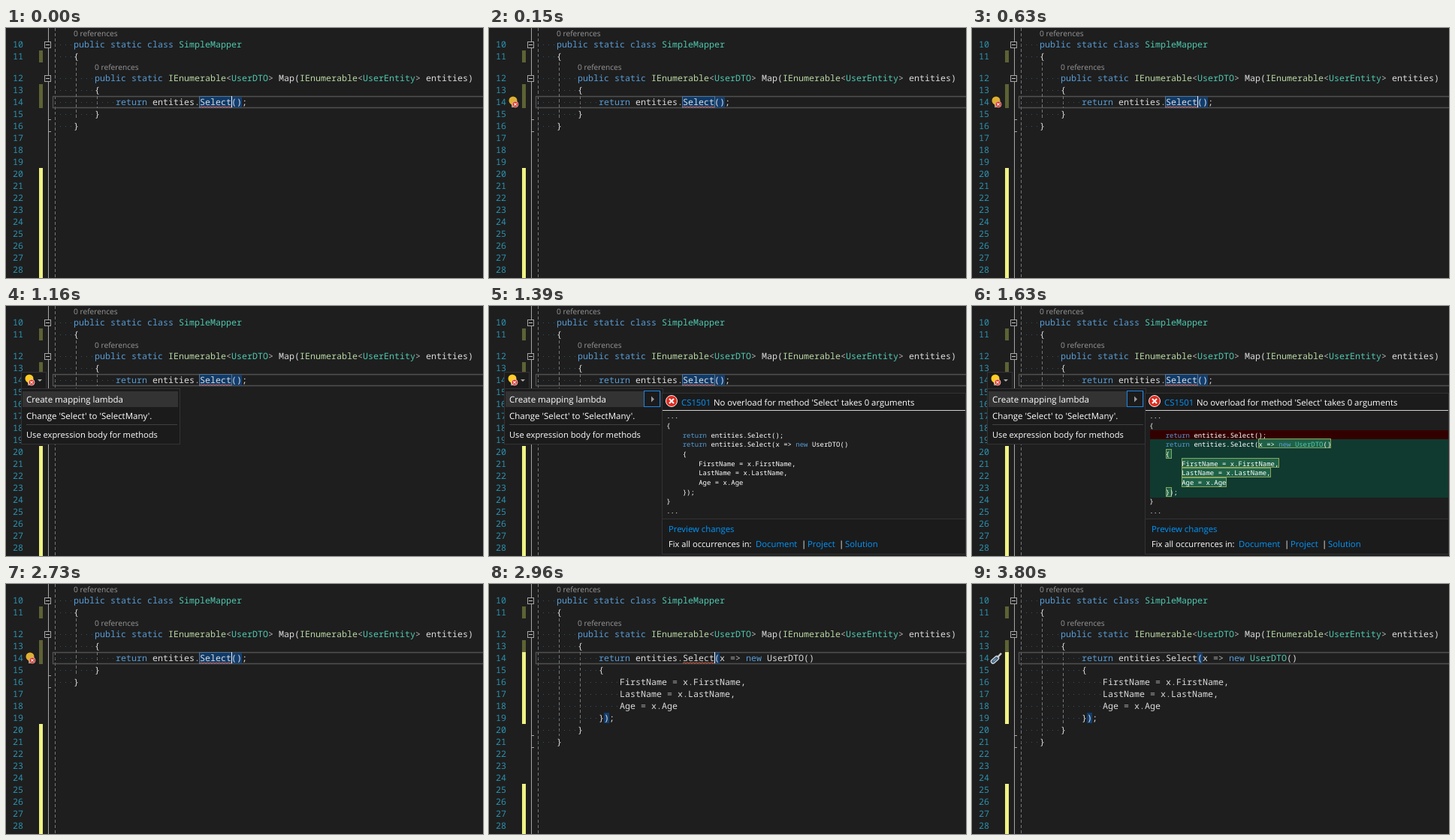
Animation of 635 by 334 pixels, one loop 3.88 s. Source, as an HTML page:

```html
<!DOCTYPE html>
<html lang="en">
<head>
<meta charset="utf-8">
<title>Create mapping lambda</title>
<style>
html, body { margin: 0; width: 100%; height: 100%; overflow: hidden; background: #1e1e1e; }
svg { display: block; width: 100%; height: 100%; }
text { white-space: pre; text-rendering: geometricPrecision; }
.code { font: 11.667px "Noto Sans Mono", monospace; }
.small { font: 500 8.96px "Noto Sans Mono", monospace; }
.ui { font: 11.35px "Open Sans", sans-serif; }
.menu { font: 11.5px "Open Sans", sans-serif; }
.tight { font: 11.15px "Open Sans", sans-serif; }
.lens { font: 10.2px "Open Sans", sans-serif; }
</style>
</head>
<body>
<svg id="stage" viewBox="0 0 635 334" xmlns="http://www.w3.org/2000/svg"></svg>
<script>
const LOOP = 3880;
const LEFT = 62, CW = 7;
const INK = '#dcdcdc', BLUE = '#569cd6', TEAL = '#4ec9b0', LINK = '#0097fb';
const PANEL = '#1b1b1c', EDGE = '#333337', OLIVE = '#5c6234', YELLOW = '#eff284';

const esc = s => s.replace(/&/g, '&amp;').replace(/</g, '&lt;').replace(/>/g, '&gt;');
const rect = (x, y, w, h, fill, stroke = 'none') =>
  `<rect x="${x}" y="${y}" width="${w}" height="${h}" fill="${fill}" stroke="${stroke}"/>`;
const frame = (x, y, w, h, fill, stroke) => rect(x + .5, y + .5, w - 1, h - 1, fill, stroke);
const path = (d, stroke, width = 1, more = '') =>
  `<path d="${d}" fill="none" stroke="${stroke}" stroke-width="${width}" ${more}/>`;
const text = (cls, x, y, s, fill = '#fff', more = '') =>
  `<text class="${cls}" x="${x}" y="${y}" fill="${fill}" ${more}>${esc(s)}</text>`;
const group = (id, body) => `<g id="${id}">${body}</g>`;

// Vertical centre of an editor line; a caption row sits above line 12.
const mid = n => n < 12 ? 22 + (n - 10) * 16 : 67 + (n - 12) * 16;

function colour(word) {
  if (/^(public|static|class|return|new)$/.test(word)) return BLUE;
  if (/^(SimpleMapper|UserDTO|UserEntity)$/.test(word)) return TEAL;
  if (word === 'IEnumerable') return '#b8d7a3';
  return /^[<>=.]+$/.test(word) ? '#b4b4b4' : INK;
}

function codeLine(n, depth, src) {
  const x0 = LEFT + depth * 4 * CW, y = mid(n);
  let out = '';
  for (let x = LEFT; x < x0; x += CW) out += rect(x + 3, y, 1, 1, '#2a536c');
  for (const m of src.matchAll(/\w+|[<>=.]+|[^\w\s<>=.]+/g))
    out += text('code', x0 + m.index * CW, y + 4, m[0], colour(m[0]),
      n === 14 && m[0] === 'UserDTO' ? 'id="dto"' : '');
  return out;
}

const codeLines = (from, list) =>
  list.map(([depth, s], i) => codeLine(from + i, depth, s)).join('');

const bar = (y, end, fill) => rect(44, y, 5, end - y, fill);
const guide = (x, y, end) => path(`M${x + .5} ${y}V${end}`, '#777', 1, 'stroke-dasharray="4 3"');
const tick = y => path(`M56 ${y + .5}H60`, '#a5a5a5');
const fold = y => frame(51, y - 4, 9, 9, '#1e1e1e', '#a5a5a5') + path(`M53 ${y + .5}H58`, '#c8c8c8');

function gutter() {
  let out = '';
  for (let n = 10; n <= 28; n++) out += text('code', 9, mid(n) + 4, String(n), '#2b91af');
  return out + path('M56.5 0V334', '#a5a5a5') + fold(22) + fold(67) + guide(65, 0, 334) +
    bar(30, 46, OLIVE) + bar(75, 91, OLIVE);
}

const header = () =>
  text('lens', 90, 11, '0 references', '#999') + text('lens', 118, 56, '0 references', '#999') +
  codeLines(10, [[1, 'public static class SimpleMapper'], [1, '{'],
    [2, 'public static IEnumerable<UserDTO> Map(IEnumerable<UserEntity> entities)'], [2, '{']]);

const before = () =>
  bar(91, 107, OLIVE) + bar(187, 334, YELLOW) + guide(93, 46, 123) + guide(121, 91, 107) +
  tick(122) + tick(138) + frame(257, 91, 44, 16, '#0f3a68', '#56748f') +
  rect(301, 92, 13, 14, '#113d6f') +
  codeLines(14, [[3, 'return entities.Select();'], [2, '}'], [1, '}']]);

const after = () =>
  bar(91, 187, YELLOW) + bar(267, 334, YELLOW) + guide(93, 46, 203) + guide(121, 91, 187) +
  tick(202) + tick(218) +
  group('braces', rect(300, 92, 7, 14, '#113d6f') + rect(153, 172, 7, 14, '#113d6f')) +
  codeLines(14, [[3, 'return entities.Select(x => new UserDTO()'], [3, '{'],
    [4, 'FirstName = x.FirstName,'], [4, 'LastName = x.LastName,'], [4, 'Age = x.Age'],
    [3, '});'], [2, '}'], [1, '}']]);

function squiggle() {
  let d = 'M258 106';
  for (let x = 260; x <= 300; x += 2) d += `L${x} ${x % 4 ? 106 : 104.5}`;
  return path(d, '#d9573f');
}

const bulb = (x, y, fill, ring) =>
  `<circle cx="${x}" cy="${y}" r="5.500" fill="${fill}"/>` + rect(x - 2, y + 4, 4, 3, fill) +
  rect(x - 2, y + 7.5, 4, 1.5, '#b0b0b0') +
  `<circle cx="${x + 3}" cy="${y + 5}" r="4" fill="#dc3028" stroke="${ring}" stroke-width=".8"/>` +
  path(`M${x + 1.3} ${y + 3.3}l3.4 3.4m0 -3.4l-3.4 3.4`, '#fff', 1.1);

const driver = () =>
  path('M28 103.5L33 99', '#d2d8de', 6.5, 'stroke-linecap="round"') +
  path('M28 103.5L33 99', '#45657f', 4, 'stroke-linecap="round"') +
  path('M34 98L39 92.5', '#d0d0d0', 2.5) + path('M28.5 103L31.5 100.3', '#a9c4da', 1);

const menu = () =>
  frame(20, 88, 34, 23, PANEL, EDGE) + bulb(31, 97, '#ffcc22', '#f4e4e0') +
  '<path d="M42 98h6l-3 3z" fill="#aaa"/>' +
  frame(20, 110, 212, 75, PANEL, EDGE) + rect(22, 114, 207, 21, '#333334') +
  rect(27, 158, 201, 1, '#3f3f46') +
  text('menu', 27, 129, 'Create mapping lambda') +
  text('menu', 27, 151, "Change 'Select' to 'SelectMany'.") +
  text('tight', 27, 176, 'Use expression body for methods');

// One line of the preview, starting at a character column.
const small = (row, col, src, type = TEAL) =>
  [...src.matchAll(/\S+?(?=\(|\s|$)|\(\S*/g)].map(m =>
    text('small', 236.2 + (col + m.index) * 5.38, 150.4 + row * 12.65, m[0],
      /^(return|new)$/.test(m[0]) ? BLUE : m[0] === 'UserDTO' ? type : '#fff')).join('');
const mark = (x, y, w) => frame(x, y, w, 13, '#1f6148', '#8aa65a');

function preview() {
  const rows = [[0, '...'], [0, '{'], [4, 'return entities.Select();'], [4, 'return entities.Select('],
    [4, '{'], [8, 'FirstName = x.FirstName,'], [8, 'LastName = x.LastName,'], [8, 'Age = x.Age'],
    [4, '});'], [0, '}'], [0, '...']];
  const lambda = 'x => new UserDTO()';
  return frame(230, 116, 405, 216, PANEL, EDGE) + rect(231, 139, 403, 145, '#1e1e1e') +
    frame(206, 113, 22, 22, PANEL, '#1c86e0') + '<path d="M216 120.500v8l4 -4z" fill="#999"/>' +
    rect(231, 139, 403, 1, '#d0d0d0') + rect(231, 284, 403, 1, EDGE) +
    '<circle cx="243" cy="127" r="7.500" fill="#e02b20" stroke="#f1f1f1"/>' +
    path('M240 124l6 6m0 -6l-6 6', '#fff', 2) +
    text('ui', 256, 133, 'CS1501', LINK) +
    text('ui', 299, 133, "No overload for method 'Select' takes 0 arguments") +
    group('diff', rect(237, 166, 397, 12, '#330000') + rect(237, 178, 397, 78, '#103a30')) +
    group('marks', mark(381, 177, 97) + mark(258, 191, 8) + mark(279, 203, 130) +
      mark(279, 216, 119) + mark(279, 229, 60) + mark(258, 242, 8)) +
    rows.map(([col, s], i) => small(i, col, s)).join('') +
    group('plain', small(3, 27, lambda, '#fff')) + group('tinted', small(3, 27, lambda)) +
    text('ui', 239, 302, 'Preview changes', LINK) +
    text('tight', 239, 322, 'Fix all occurrences in:') +
    text('ui', 355, 322, 'Document', LINK) + text('ui', 416, 322, '|') +
    text('ui', 424, 322, 'Project', LINK) + text('ui', 466, 322, '|') +
    text('ui', 474, 322, 'Solution', LINK);
}

const stage = document.getElementById('stage');
stage.innerHTML = rect(0, 0, 635, 334, '#1e1e1e') + gutter() +
  path('M636 91.5H62.5V106.5H636', '#505050', 1.4) +
  header() + group('before', before()) + group('after', after()) +
  group('squiggle', squiggle()) + group('caret', rect(300, 91, 1, 15, '#f0f0f0')) +
  group('bulb', bulb(32, 97, '#dfb030', '#d8c0b8')) + group('driver', driver()) +
  group('menu', menu()) + group('preview', preview());

// Each part is visible during the listed [start, end) spans, in ms.
const spans = {
  before: [[0, 2880]],
  after: [[2880, LOOP]],
  braces: [[2960, LOOP]],
  squiggle: [[0, 3800]],
  caret: [[0, 150], [630, 1160], [2730, 3360]],
  bulb: [[150, 1160], [2730, 2880]],
  driver: [[3570, LOOP]],
  menu: [[1160, 2730]],
  preview: [[1390, 2730]],
  diff: [[1560, 2730]],
  marks: [[1630, 2730]],
  plain: [[1390, 1630]],
  tinted: [[1630, 2730]]
};
const parts = Object.entries(spans).map(([id, list]) => [document.getElementById(id), list]);
const dto = document.getElementById('dto');

function draw(t) {
  for (const [el, list] of parts)
    el.style.display = list.some(([a, b]) => t >= a && t < b) ? '' : 'none';
  dto.setAttribute('fill', t < 3360 ? INK : TEAL);
}

const start = performance.now();
function run() {
  draw((performance.now() - start) % LOOP);
  requestAnimationFrame(run);
}
run();
</script>
</body>
</html>
```
